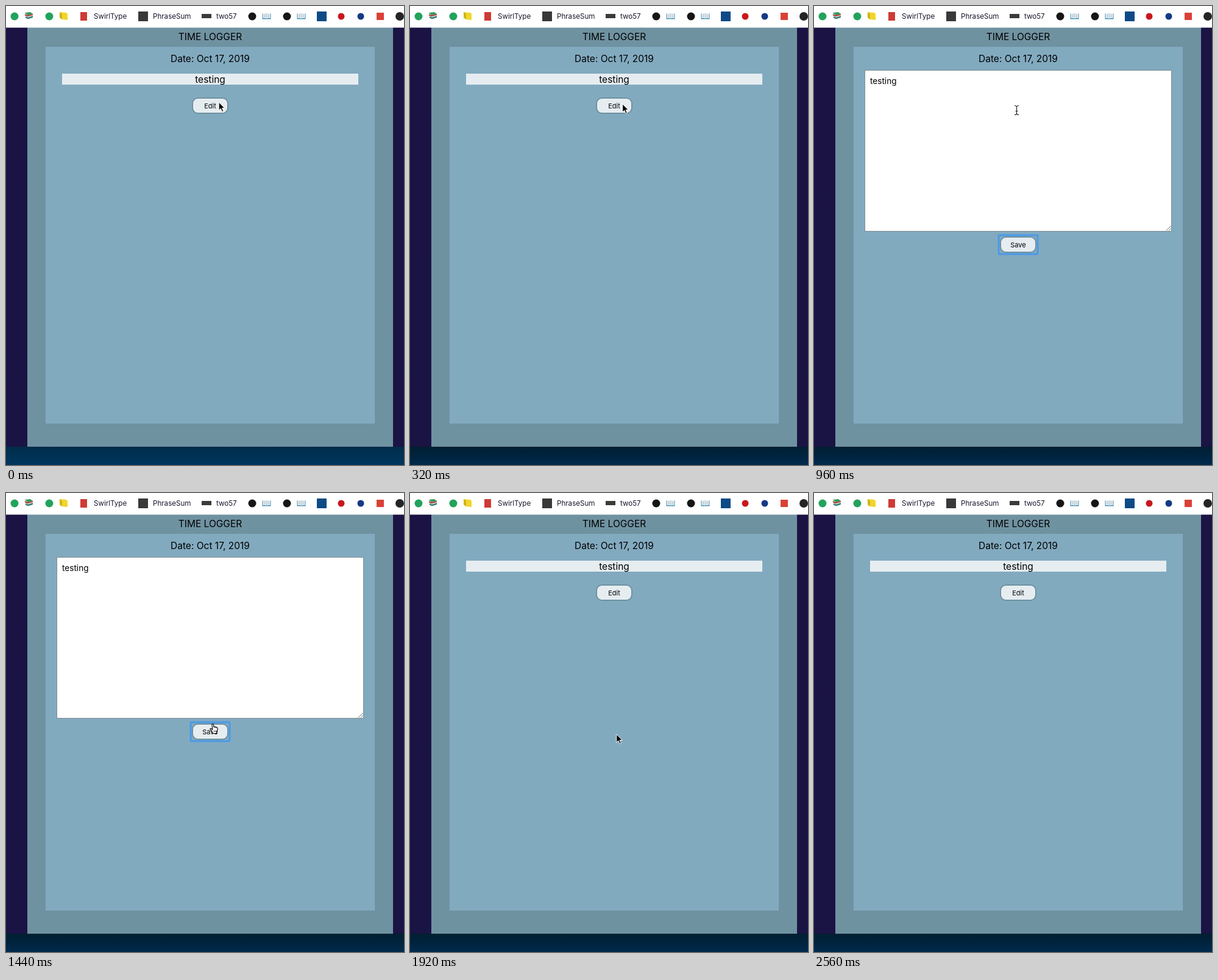
These frames come from a looping animation (653 by 753 pixels, 3.04 s). An HTML page:

```html
<!DOCTYPE html>
<html lang="en">
<head>
<meta charset="utf-8">
<title>Time logger</title>
<style>
  html, body { margin: 0; width: 100%; height: 100%; overflow: hidden; background: #1a1442; }
  svg { display: block; width: 653px; height: 753px; }
  text { font-family: Inter, "Open Sans", sans-serif; font-size: 15.5px; fill: #000; }
  .mid { text-anchor: middle; }
  .mark { font-size: 11.6px; fill: #16162c; }
  .small { font-size: 11px; }
  .field { font-size: 13.6px; }
  .btn { fill: #e6edf1; stroke: #6f92a1; stroke-width: 2; }
  .hover .btn { fill: #6f92a1; }
  .edit .view, svg:not(.edit) .form { display: none; }
</style>
</head>
<body>
<svg id="stage" viewBox="0 0 653 753">
  <defs>
    <linearGradient id="early" x2="0" y2="1">
      <stop stop-color="#002c49"/><stop offset="1" stop-color="#00365f"/>
    </linearGradient>
    <linearGradient id="late" x2="0" y2="1">
      <stop stop-color="#001f31"/><stop offset=".45" stop-color="#00233d"/><stop offset="1" stop-color="#002a4d"/>
    </linearGradient>
    <linearGradient id="side" x2="0" y2="1">
      <stop stop-color="#1a1343"/><stop offset="1" stop-color="#1a1444"/>
    </linearGradient>
    <g id="book">
      <path d="M0 1h14v9H0z" fill="#3f8fb5"/>
      <path d="M1 0.5Q4.500-.5 7 1.200 9.500-.5 13 .5V8.500Q9.500 7.800 7 9 4.500 7.800 1 8.500Z" fill="#f0f4f5"/>
      <path d="M7 1.200V9M2.500 2.700H5.500M2.500 4.500H5.500M2.500 6.300H5.500M8.500 2.700H11.500M8.500 4.500H11.500M8.500 6.300H11.500" fill="none" stroke="#8ba5b2" stroke-width=".7"/>
    </g>
  </defs>

  <rect width="653" height="753" fill="url(#side)"/>
  <rect id="foot" y="723" width="653" height="30"/>
  <rect x="35" y="35" width="600" height="688" fill="#6f92a1"/>
  <rect x="65" y="67" width="540" height="618" fill="#82aabf"/>
  <text class="mid" x="335" y="56">TIME LOGGER</text>
  <text class="mid" x="335" y="92">Date: Oct 17, 2019</text>

  <g class="view">
    <rect x="92" y="111" width="486" height="18" fill="#e6edf1"/>
    <text class="mid" x="335" y="126">testing</text>
    <rect class="btn" x="306" y="151" width="58" height="25" rx="9"/>
    <text class="mid small" x="335" y="168">Edit</text>
  </g>

  <g class="form">
    <rect x="83.500" y="105.500" width="503" height="264" fill="#fff" stroke="#7d8c94"/>
    <path d="M578 368.500L585.500 361M582 368.500L585.500 365" stroke="#555" stroke-width=".9"/>
    <text class="field" x="92" y="128">testing</text>
    <rect x="303" y="376" width="64" height="31" rx="1.500" fill="none" stroke="#4a9ae8" stroke-width="3"/>
    <rect class="btn" x="306" y="379" width="58" height="25" rx="9"/>
    <text class="mid small" x="335" y="396">Save</text>
  </g>

  <rect width="653" height="35.500" fill="#fff"/>
  <g id="icons">
    <circle cx="14" cy="17" r="6.500" fill="#22a35c"/>
    <path d="M31 11l9-1 4 3-9 2z" fill="#2f9a5b"/>
    <path d="M31 13l4 2 9-2v2l-9 2.500-4-2z" fill="#a8443c"/>
    <path d="M32 17l4 1.500 8-2.500v3l-8 2.500-4-2z" fill="#3b7f78"/>
    <circle cx="71" cy="17" r="6.500" fill="#22a35c"/>
    <path d="M88 10l11 1 2 2v10l-9-1-4-3z" fill="#f0d62a"/>
    <path d="M88 10l4 3v9l-4-3z" fill="#cdb31c"/>
    <rect x="122" y="10" width="11" height="14" fill="#cf3a35"/>
    <rect x="217" y="9" width="16" height="16" fill="#393939"/>
    <rect x="321" y="13" width="16" height="7" fill="#3b3b3a"/>
    <circle cx="404" cy="17" r="6.500" fill="#161616"/>
    <use href="#book" x="420.500" y="11.500"/>
    <circle cx="461" cy="17" r="6.500" fill="#161616"/>
    <use href="#book" x="477.500" y="11.500"/>
    <rect x="510" y="9" width="16" height="16" fill="#0d4a86"/>
    <circle cx="550" cy="17" r="5.500" fill="#c8171e"/>
    <circle cx="582" cy="17" r="5.500" fill="#153a85"/>
    <rect x="608" y="11" width="12" height="12" fill="#da4137"/>
    <circle cx="646" cy="17" r="7" fill="#242424"/>
  </g>
  <text class="mark" x="144" y="21">SwirlType</text>
  <text class="mark" x="241" y="21">PhraseSum</text>
  <text class="mark" x="345" y="21">two57</text>

  <g id="cursor" stroke-linejoin="round">
    <path id="arrow" d="M.7.800V14.200L3.800 11.300 6.100 16.500 8.300 15.500 6.100 10.500H10.200Z" fill="#000" stroke="#fff"/>
    <g id="hand">
      <path d="M4 1.700C4 .3 6.200.3 6.400 1.700L7 6.300C7.300 5 9 5.100 9.200 6.500 9.700 5.500 11.200 5.700 11.300 7.100 12 6.500 13.200 7 13.200 8.300 13.300 11 12.300 12.400 11.600 14V16.500H5.800C5.500 14.500 3.200 12.500 1.300 10 .3 8.600 1.700 7.800 2.900 8.800L4.800 10.300Z" fill="#fff" stroke="#000" stroke-width="1.100"/>
      <path d="M7.300 11.500V14M9 11.500V14M10.700 11.500V14" stroke="#000" stroke-width=".7"/>
    </g>
    <path id="beam" d="M-3.500-7.500Q0-7.500 0-5V5Q0 7.500-3.500 7.500M3.500-7.500Q0-7.500 0-5M0 5Q0 7.500 3.500 7.500M-2 1.500H2" fill="none" stroke="#222" stroke-width="1.200"/>
  </g>
</svg>
<script>
  const LOOP = 3040;
  // start ms, cursor shape, x, y, page mode flags
  const poses = [
    [0, "arrow", 348.5, 157, ""],
    [160, "arrow", 349, 169, ""],
    [320, "arrow", 348, 160, ""],
    [480, "hand", 338, 165, "hover"],
    [640, "hand", 328, 172, "hover"],
    [800, "hand", 327, 171, "hover"],
    [960, "beam", 332.5, 171, "edit"],
    [1280, "arrow", 338, 378, "edit"],
    [1440, "hand", 334, 378, "edit"],
    [1600, "hand", 334, 396, "edit hover"],
    [1760, "hand", 333, 396, "edit hover"],
    [1920, "arrow", 338, 395, ""],
    [2080, "arrow", 344, 146, ""],
    [2240, "arrow", 350, 3, ""],
    [2400, "", 0, 0, ""]
  ];
  const $ = id => document.getElementById(id);
  const shapes = ["arrow", "hand", "beam"].map($);
  const start = performance.now();

  function draw(now) {
    const t = Math.max(0, now - start) % LOOP;
    const [, shape, x, y, mode] = poses.filter(p => p[0] <= t).pop();
    $("stage").setAttribute("class", mode);
    $("cursor").setAttribute("transform", `translate(${x} ${y})`);
    for (const s of shapes) s.style.display = s.id === shape ? "" : "none";
    $("foot").setAttribute("fill", t < 320 ? "url(#early)" : "url(#late)");
    requestAnimationFrame(draw);
  }
  draw(start);
</script>
</body>
</html>
```
